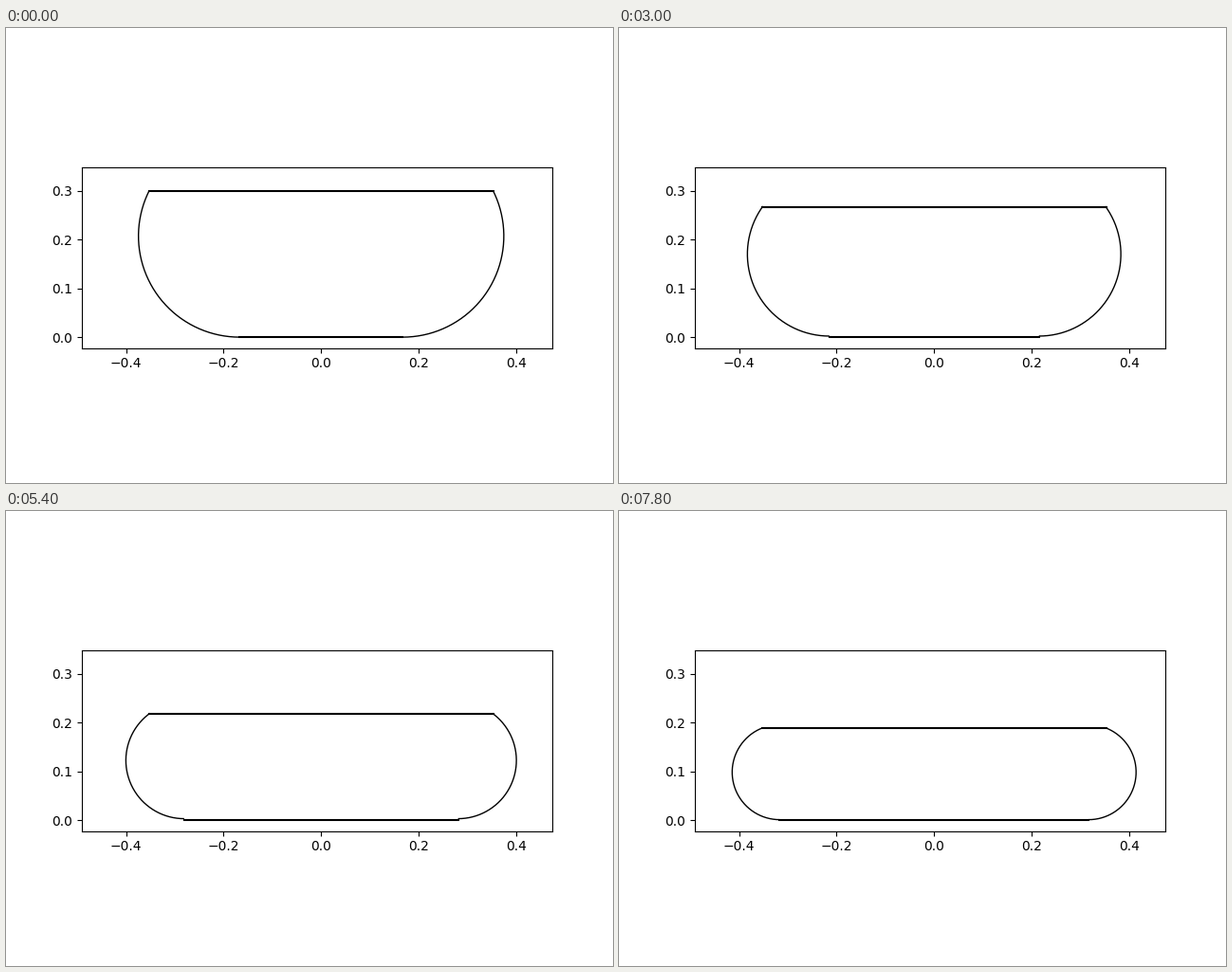
A matplotlib script for the animation above (8 s loop, 640x480 px).

```python
import numpy as np
import matplotlib.pyplot as plt
from matplotlib.animation import FuncAnimation

HALF = 0.353                # half width of the top plate
SKIN = 3 * np.pi / 8        # length of the flexible skin touching the ground
H0 = 0.3
PRESSURE, MASS, G = 2000, 100, 9.8
DT = 0.01
FRAMES = 40


def shape(h):
    """Half contact width, side radius and top angle at plate height h."""
    lo, hi = 0.0, HALF
    for _ in range(50):
        x = (lo + hi) / 2
        r = ((HALF - x) ** 2 + h * h) / (2 * h)
        beta = np.arcsin(np.clip((h - r) / r, -1, 1))
        if 2 * (np.pi / 2 + beta) * r + 2 * x < SKIN:
            lo = x
        else:
            hi = x
    return x, r, beta


def simulate():
    h, v = H0, 0.0
    states = []
    for _ in range(FRAMES):
        x, r, beta = shape(h)
        h += v * DT
        v += (PRESSURE * 2 * x / MASS - G) * DT
        states.append((h, x, r, beta))
    return states


states = simulate()

fig, ax = plt.subplots(figsize=(6.4, 4.8), dpi=100)
ax.set_aspect("equal")
ax.set_xlim(-0.4908, 0.4742)
ax.set_ylim(-0.0223, 0.3481)
ax.set_xticks([-0.4, -0.2, 0, 0.2, 0.4])
ax.set_yticks([0, 0.1, 0.2, 0.3])

top, = ax.plot([], [], "k", lw=1.5)
floor, = ax.plot([], [], "k", lw=1.5)
left, right = (ax.plot([], [], "k", lw=1, solid_capstyle="butt")[0]
               for _ in range(2))


def update(i):
    h, x, r, beta = states[i]
    top.set_data([-HALF, HALF], [h, h])
    floor.set_data([-x, x], [0, 0])
    # the side arcs keep their centres while the plate moves on
    radius = np.hypot(HALF - x, h - r)
    t = np.linspace(-np.pi / 2, beta, 160)
    dx, y = x + radius * np.cos(t), r + radius * np.sin(t)
    left.set_data(-dx, y)
    right.set_data(dx, y)
    return top, floor, left, right


anim = FuncAnimation(fig, update, frames=FRAMES, interval=200,
                     repeat=True, repeat_delay=0)
plt.show()
```
